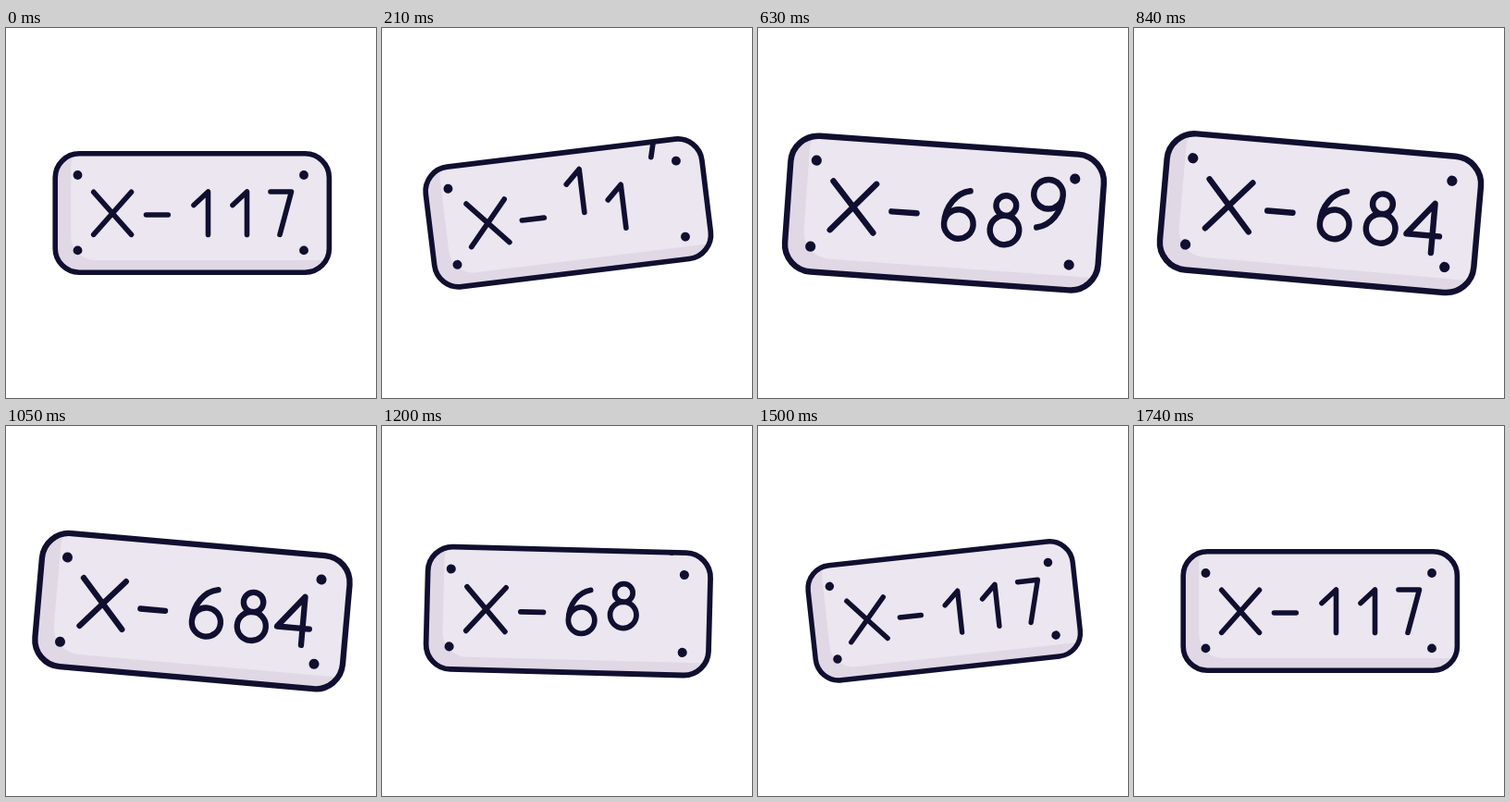
Animation of 400x400 px, one loop 5.09 s. Source, as an HTML page with a canvas:

```html
<!DOCTYPE html>
<html lang="en">
<head>
<meta charset="utf-8">
<title>Number plate</title>
<style>
  html, body { margin: 0; width: 100%; height: 100%; overflow: hidden; background: #fff; }
  canvas { display: block; width: 100vw; height: 100vh; }
</style>
</head>
<body>
<canvas id="stage"></canvas>
<script>
const LOOP = 5090, MOVE_END = 1740, STEP = 30;
const INK = '#100f30', FACE = '#ebe6ef', SHADE = '#e0d8e5';
const LINE = 5.6, ROLL = 180, ROLL_TIME = 290;

const canvas = document.getElementById('stage');
const ctx = canvas.getContext('2d');

// Keys: [time, value], eased between neighbours
const SCALE = [[90, 1], [690, 1.15], [960, 1.15], [1387, 0.95], [1637, 1]];
const TILT = [[0, 0], [197, -7], [719, 5], [1066, 5], [1440, -7], [1735, 0]];

// Glyphs are drawn around the column centre, baseline to cap height -23..23.4
const GLYPHS = {
  1: p => { p.moveTo(-12.4, -8.5); p.lineTo(3.1, -23); p.lineTo(3.1, 23.4); },
  4: p => { p.moveTo(16.5, 7.4); p.lineTo(-14.5, 7.4); p.lineTo(10, -23); p.lineTo(10, 23.4); },
  6: p => six(p, 1),
  7: p => { p.moveTo(-12, -23); p.lineTo(10.5, -23); p.lineTo(-2, 23.4); },
  8: p => { ring(p, 1.6, -13.6, 9.5); ring(p, 1.6, 9.5, 13.8); },
  9: p => six(p, -1)
};

// Each column: centre x, first digit, then [start, next digit] rolls
const COLUMNS = [
  { x: 215.4, first: 1, rolls: [[147, 6], [1230, 1]] },
  { x: 257.4, first: 1, rolls: [[360, 8], [1166, 1]] },
  { x: 298, first: 7, rolls: [[85, 9], [578, 4], [1058, 7]] }
];

function ring(p, x, y, r) {
  p.moveTo(x + r, y);
  p.arc(x, y, r, 0, Math.PI * 2);
}

// dir -1 turns the six into a nine
function six(p, dir) {
  ring(p, 0, 9.4 * dir, 13.8);
  p.moveTo(8.9 * dir, -22.5 * dir);
  p.bezierCurveTo(-4 * dir, -20 * dir, -13.8 * dir, -7 * dir, -13.8 * dir, 9.4 * dir);
}

function ease(u) {
  u = Math.min(1, Math.max(0, u));
  return u * u * (3 - 2 * u);
}

function track(keys, t) {
  let value = keys[0][1];
  for (let i = 1; i < keys.length; i++) {
    const [t0, v0] = keys[i - 1], [t1, v1] = keys[i];
    if (t > t0) value = v0 + (v1 - v0) * ease((t - t0) / (t1 - t0));
  }
  return value;
}

function stroke(draw, x = 0, y = 0) {
  ctx.save();
  ctx.translate(x, y);
  ctx.beginPath();
  draw(ctx);
  ctx.stroke();
  ctx.restore();
}

function platePath(dx = 0, dy = 0) {
  ctx.beginPath();
  ctx.roundRect(53.2 + dx, 135.8 + dy, 296.2, 128.4, 26);
}

function drawColumn({ x, first, rolls }, t) {
  let prev = first, digit = first, start = -ROLL_TIME;
  for (const [time, next] of rolls) {
    if (t < time) break;
    prev = digit;
    digit = next;
    start = time;
  }
  const k = ease((t - start) / ROLL_TIME);
  if (k < 1) stroke(GLYPHS[prev], x, 200 - ROLL * k);
  stroke(GLYPHS[digit], x, 200 + ROLL * (1 - k));
}

function drawPlate(t) {
  ctx.save();
  platePath();
  ctx.clip();
  ctx.fillStyle = SHADE;
  ctx.fillRect(40, 120, 320, 160);
  ctx.fillStyle = FACE;
  platePath(17, -13.2);
  ctx.fill();
  COLUMNS.forEach(column => drawColumn(column, t));
  ctx.restore();

  platePath();
  ctx.stroke();

  stroke(p => {
    p.moveTo(94.7, 177.3); p.lineTo(135.5, 223.4);
    p.moveTo(135.5, 177.3); p.lineTo(94.7, 223.4);
    p.moveTo(151.5, 202); p.lineTo(175.3, 202);
  });

  ctx.fillStyle = INK;
  for (const x of [77.5, 322]) {
    for (const y of [159, 240.4]) {
      ctx.beginPath();
      ctx.arc(x, y, 4.9, 0, Math.PI * 2);
      ctx.fill();
    }
  }
}

function render(now) {
  const dpr = window.devicePixelRatio || 1;
  const w = Math.round(innerWidth * dpr), h = Math.round(innerHeight * dpr);
  if (canvas.width !== w || canvas.height !== h) {
    canvas.width = w;
    canvas.height = h;
  }
  const t = Math.min(MOVE_END, Math.floor((now % LOOP) / STEP) * STEP);
  const fit = Math.min(w, h) / 400, zoom = track(SCALE, t);

  ctx.setTransform(1, 0, 0, 1, 0, 0);
  ctx.fillStyle = '#fff';
  ctx.fillRect(0, 0, w, h);
  ctx.setTransform(fit, 0, 0, fit, (w - 400 * fit) / 2, (h - 400 * fit) / 2);
  ctx.translate(200, 200);
  ctx.rotate(track(TILT, t) * Math.PI / 180);
  ctx.scale(zoom, zoom);
  ctx.translate(-200, -200);
  ctx.strokeStyle = INK;
  ctx.lineWidth = LINE;
  ctx.lineCap = ctx.lineJoin = 'round';
  drawPlate(t);
}

const begin = performance.now();
function tick() {
  render(performance.now() - begin);
  requestAnimationFrame(tick);
}
tick();
</script>
</body>
</html>
```
